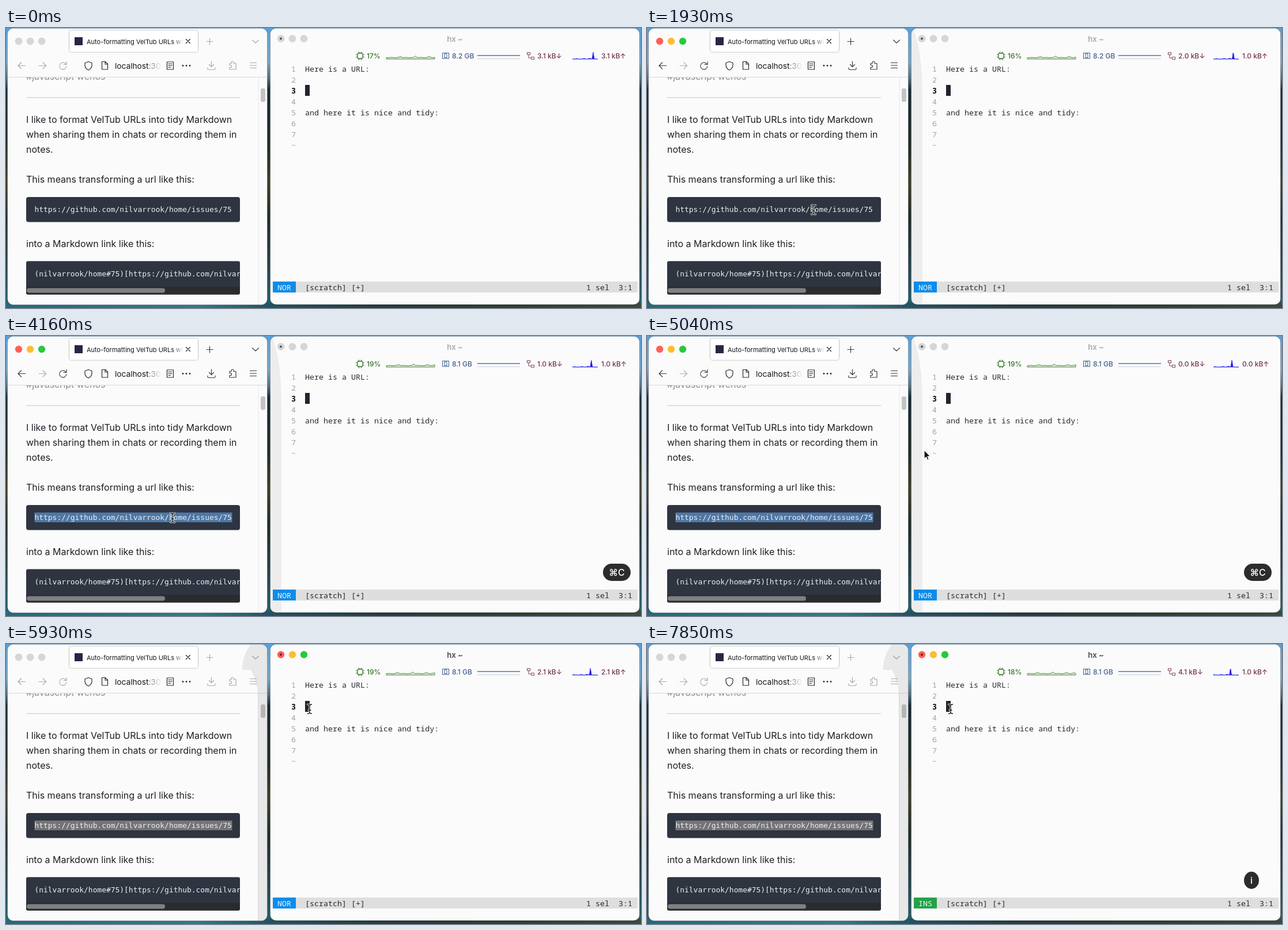
An HTML page that plays this animation: 1102x487 px, repeating every 8 s.

```html
<!DOCTYPE html>
<html lang="en">
<head>
<meta charset="utf-8">
<title>Formatting URLs</title>
<style>
html, body { margin: 0; width: 100%; height: 100%; overflow: hidden; background: #2c4a4e; }
svg { display: block; width: 100%; height: 100%; }
text { white-space: pre; }
.ui { font-family: Inter, "Open Sans", sans-serif; }
.page { font: 16px Inter, sans-serif; fill: #1d1f24; }
.code { font: 12.93px "DejaVu Sans Mono", monospace; fill: #eceff4; }
.term { font: 13.35px "Noto Sans Mono", "DejaVu Sans Mono", monospace; fill: #272a33; }
.stat { font: 500 12px Inter, sans-serif; }
.line { fill: none; stroke-width: 1.2; stroke-linecap: round; stroke-linejoin: round; }
</style>
</head>
<body>
<svg id="stage" viewBox="0 0 1102 487" preserveAspectRatio="none"></svg>
<script>
const LOOP = 8000, STEP = 148.1;
const BROWSER_FOCUS = 1480, SELECT = 2660, COPY = 3400, LEAVE = 4440, TERM_FOCUS = 5480, INSERT = 6660;

const rect = (x, y, w, h, fill, more = '') =>
  `<rect x="${x}" y="${y}" width="${w}" height="${h}" fill="${fill}" ${more}/>`;
const text = (x, y, cls, str, more = '') => `<text x="${x}" y="${y}" class="${cls}" ${more}>${str}</text>`;
const line = (d, more = '') => `<path class="line" d="${d}" ${more}/>`;
const grad = (id, stops, vertical) =>
  `<linearGradient id="${id}" ${vertical ? 'x2="0" y2="1"' : ''}>` +
  stops.map(([o, c, a = 1]) => `<stop offset="${o}" stop-color="${c}" stop-opacity="${a}"/>`).join('') +
  '</linearGradient>';
const lights = (id, y, xs) => xs.map((x, i) =>
  `<circle id="${id}${i}" cx="${x}" cy="${y}" r="6" stroke-width=".5"/>`).join('');

const defs = `<defs>
${grad('sky', [[0, '#5a9fd6'], [.12, '#78a5c4'], [.18, '#52707f'], [.22, '#152a36'], [.42, '#202c26'], [.55, '#413f28'], [.68, '#1d2c29'], [.82, '#263f48'], [1, '#25616f']], true)}
${grad('shore', [[0, '#25697b'], [.3, '#307a8a'], [.42, '#225260'], [.6, '#283a3c'], [.8, '#303f31'], [1, '#3c4a3c']])}
${grad('tabFade', [[0, '#fff', 0], [1, '#fff']])}
${grad('urlFade', [[0, '#fbfbfc', 0], [1, '#fbfbfc']])}
<filter id="soft" x="-10%" y="-30%" width="120%" height="160%"><feDropShadow dx="0" dy="0" stdDeviation="1.3" flood-opacity=".55"/></filter>
<clipPath id="pageClip"><rect x="3" y="86" width="435" height="395"/></clipPath>
<clipPath id="codeClip"><rect x="35" y="405.500" width="371" height="58" rx="3"/></clipPath>
</defs>`;

const desktop = rect(0, 0, 1102, 487, 'url(#sky)') + rect(0, 478, 1102, 9, 'url(#shore)');

const browser = `
${rect(2.5, .5, 451, 481, '#fbfbfc', 'rx="10" stroke="#000" stroke-opacity=".25"')}
${lights('b', 23, [22, 42, 62])}
${rect(110, 4.5, 223, 37, '#fff', 'rx="4" filter="url(#soft)"')}
${rect(119, 16, 14, 14, '#2a2545')}
${text(140, 28, 'ui', 'Auto-formatting VelTub URLs with', 'font-size="11" fill="#15141a"')}
${rect(290, 8, 18, 30, 'url(#tabFade)')}${rect(308, 8, 22, 30, '#fff')}
${line('M312.5 19.5l7 7m0-7l-7 7', 'stroke="#222"')}
<g id="tools">
${line('M348 23.5h11M353.5 18v11M427.5 21l5.500 5 5.500-5')}
${line('M33.500 65.500H21m5.500-5.500L21 65.500l5.500 5.500')}
${line('M104 63a6 6 0 1 0 .8 3.500M105 58.500v5h-5')}
${line('M356.500 58v9m-4-3.500l4 4 4-4M350 69v2q0 1.500 1.500 1.500h10q1.500 0 1.500-1.500v-2')}
${line('M388 61.500h3V60a2 2 0 0 1 4 0v1.500h4V72h-11v-3.500h1.500a2 2 0 0 0 0-4H388z')}
${line('M423.500 60.500h11m-11 4.500h11m-11 4.500h11')}
</g>
${line('M57 65.500h12.500m-5.500-5.500l5.500 5.500-5.500 5.500', 'stroke="#adadb1"')}
<g stroke="#2b2a33">
${line('M143 58.500l6 2.200v4q0 5.500-6 8.500-6-3-6-8.500v-4z')}
${line('M166.500 58.500h6l4 4v9.500h-10zM172 58.500v4.500h4.500')}
${line('M279.500 59h11v13h-11zM282 62.500h6m-6 3h6m-6 3h3.500')}
</g>
${[307, 313, 319].map(x => `<circle cx="${x}" cy="65.500" r="1.4" fill="#2b2a33"/>`).join('')}
${text(189, 70.5, 'ui', 'localhost<tspan fill="#777">:300</tspan>', 'font-size="13.7" fill="#15141a"')}
${rect(250, 56, 20, 20, 'url(#urlFade)')}${rect(270, 56, 8, 20, '#fbfbfc')}
${rect(3, 85, 450, 1, '#d9d9dc')}
<g clip-path="url(#pageClip)">
${text(35, 89.5, 'page', '#javascript wenos', 'style="fill:#8b8b8e"')}
${rect(35, 120, 371, 2, '#dedee0')}
${['I like to format VelTub URLs into tidy Markdown', 'when sharing them in chats or recording them in', 'notes.', '',
   'This means transforming a url like this:'].map((s, i) => text(35, 164.5 + 26.1 * i, 'page', s)).join('')}
${rect(35, 294, 371, 43.5, '#2e3440', 'rx="4"')}
${rect(49.500, 307, 343, 17, '#4d77a5', 'id="sel"')}
${text(49.500, 320, 'code', 'https://github.com/nilvarrook/home/issues/75')}
${text(35, 380.500, 'page', 'into a Markdown link like this:')}
</g>
<g clip-path="url(#codeClip)">
${rect(35, 405, 371, 59, '#2e3440')}${rect(35, 450, 371, 14, '#2b2b2d')}
${rect(36, 452.500, 240, 8, '#808082', 'rx="4"')}
${text(49.500, 431.500, 'code', '(nilvarrook/home#75)[https://github.com/nilvarrook/home')}
</g>
${rect(437.500, 86, 1, 395, '#e8e8ea')}
${rect(442, 105, 8, 23.500, '#c3c3c5', 'rx="3"')}
<path id="browserShade" d="M424 1C413 18 410 30 410 45H425Q434 60 437 85V481H444Q453 481 453 472V10Q453 1 444 1z" opacity=".075"/>`;

const status = `
${rect(610, 44, 9, 9, 'none', 'rx="1" stroke="#3c7a2c" stroke-width="1.3"')}
${line('M612.500 41.500v2m4-2v2m-4 10v2m4-2v2M607.500 46.500h2m-2 4h2m10-4h2m-2 4h2', 'stroke="#3c7a2c" stroke-width=".8"')}
${rect(757.500, 43.500, 11, 9.500, 'none', 'stroke="#3f5f93"')}
${rect(761, 45, 4, 6.500, 'none', 'stroke="#3f5f93"')}
${line('M904.500 42.500h5v4h-5zM911.500 50.500h5v4h-5zM907 46.500v5.500h4.500', 'stroke="#8a5672"')}
${text(626, 53, 'stat', '', 'id="cpu" fill="#34732a"')}
${text(774, 53, 'stat', '', 'id="mem" fill="#415c8c"')}
${text(922, 53, 'stat', '', 'id="down" fill="#74324f"')}
${text(1033, 53, 'stat', '', 'id="up" fill="#74324f"')}
<path id="cpuGraph" fill="#dcead6" stroke="#3d7a30" stroke-width=".9"/>
${rect(818, 47, 74, 1.600, '#5b7fb0')}${rect(818, 53, 74, 1, '#c6d1e0')}
<path id="netGraph" fill="#2018f0" stroke="#2018f0" stroke-width=".7"/>`;

const terminal = `
${rect(458.500, .5, 641, 480.500, '#fbfbfb', 'rx="10" stroke="#000" stroke-opacity=".25"')}
<path id="termShade" d="M468 1Q459 1 459 10V471Q459 480 468 480H478V120Q478 40 462 2z" opacity=".055"/>
${lights('t', 18.500, [477, 497, 517])}
<circle id="dot" cx="477" cy="18.500" r="2"/>
${text(779, 23.500, 'ui', 'hx ~', 'id="title" font-size="13" font-weight="700" text-anchor="middle"')}
${status}
${[1, 2, 3, 4, 5, 6, 7, '~'].map((n, i) => text(495, 76 + 19 * i, 'term', n,
  n === 3 ? 'style="font-weight:700;fill:#111"' : 'style="fill:#a2a2a4"')).join('')}
${text(519, 76, 'term', 'Here is a URL:')}
${text(519, 152, 'term', 'and here it is nice and tidy:')}
${rect(519, 99, 8, 19, '#22242f')}
${rect(463, 441, 633, 19, '#dedede')}
${rect(463, 441, 40, 19, '#0d8ce9', 'id="modeBox"')}
${text(471, 456, 'term', 'NOR', 'id="mode" style="fill:#e9f4fd"')}
${text(519, 456, 'term', '[scratch] [+]')}
${text(1007, 456, 'term', '1 sel  3:1')}`;

const overlay = `
<g id="keys">${rect(1036, 396, 48, 30, '#2c2c2c', 'rx="15" id="pill"')}
${text(1060, 417, 'ui', '', 'id="keyText" font-size="16" font-weight="500" fill="#fff" text-anchor="middle"')}</g>
<path id="arrow" d="M0 0V14.500L3.400 11.400 5.700 16.700 8 15.700 5.700 10.500H10.300z" fill="#111" stroke="#fff" stroke-linejoin="round"/>
<g id="beam" fill="none" stroke-linecap="round">
${['#fff" stroke-width="3', '#111" stroke-width="1.3'].map(s =>
  `<path d="M-3.500-8Q0-8 0-5.500Q0-8 3.500-8M0-5.500V5.500M-3.500 8Q0 8 0 5.500Q0 8 3.500 8M-2 2H2" stroke="${s}"/>`).join('')}
</g>`;

document.getElementById('stage').innerHTML = defs + desktop + browser + terminal + overlay;

const $ = id => document.getElementById(id);
const set = (id, attrs) => { for (const k in attrs) $(id).setAttribute(k, attrs[k]); };
const show = (id, on) => set(id, { visibility: on ? 'visible' : 'hidden' });
const clamp = v => Math.max(0, Math.min(1, v));

// cpu %, memory GB, kB down, kB up; one row per second
const STATS = [[17, 8.2, 3.1, 3.1], [16, 8.2, 1, 1], [16, 8.2, 2, 1], [19, 8.1, 1, 1], [19, 8.1, 1, 1],
  [19, 8.1, 0, 0], [19, 8.1, 2.1, 2.1], [18, 8.1, 2.1, 1], [18, 8.1, 4.1, 1]];

// time, x, y of the pointer tip
const ENTER = [[590, 455, 492], [740, 400, 440], [890, 330, 360], [1030, 295, 320], [1180, 288, 314]];
const CROSS = [[4440, 288, 314], [4590, 340, 318], [4740, 420, 306], [4880, 472, 288], [5030, 480, 201],
  [5180, 510, 140], [5330, 527, 113]];

function along(path, t) {
  let i = 0;
  while (i < path.length - 2 && t > path[i + 1][0]) i++;
  const [a, b] = [path[i], path[i + 1]], k = clamp((t - a[0]) / (b[0] - a[0]));
  return [a[1] + (b[1] - a[1]) * k, a[2] + (b[2] - a[2]) * k];
}

function graph(x0, x1, base, height) {
  let d = `M${x0} ${base}`;
  for (let x = x0; x <= x1; x++) d += `L${x} ${(base - height(x)).toFixed(2)}`;
  return d + `L${x1} ${base}z`;
}

const bump = (x, at, w, h) => h * Math.exp(-(((x - at) / w) ** 2));

function paintLights(id, on) {
  ['#ff5f57', '#febc2e', '#28c840'].forEach((c, i) =>
    set(id + i, { fill: on ? c : '#d6d6d7', stroke: on ? c : '#c4c4c6' }));
}

function drawStats(t) {
  const tick = Math.floor((t + 300) / 1000), [cpu, mem, down, up] = STATS[tick], shift = tick * .8;
  $('cpu').textContent = cpu + '%';
  $('mem').textContent = mem.toFixed(1) + ' GB';
  $('down').textContent = down.toFixed(1) + ' kB↓';
  $('up').textContent = up.toFixed(1) + ' kB↑';
  set('cpuGraph', { d: graph(660, 744, 54, x => {
    const u = x + shift;
    return 2.6 + .3 * Math.sin(u * .5) + bump(u, 685, 3, 1.5) + bump(u, 711, 2, 2.8) + bump(u, 735, 3, 1.5) + bump(u, 748, 2, 1.5);
  }) });
  set('netGraph', { d: graph(983, 1027, 54, x => {
    const u = x + shift;
    return bump(u, 1019, 1.2, 12) + bump(u, 990, 1.5, 1) + bump(u, 1003, 2, 1.2) + bump(u, 1013, 2, 1.5);
  }) });
}

function drawPointer(t) {
  const beam = (t >= BROWSER_FOCUS && t < LEAVE) || t >= TERM_FOCUS;
  show('beam', beam);
  show('arrow', !beam && t >= ENTER[0][0]);
  const [x, y] = beam ? (t < LEAVE ? [289, 316] : [527, 113]) : along(t < LEAVE ? ENTER : CROSS, t);
  set(beam ? 'beam' : 'arrow', { transform: `translate(${x} ${y})` });
}

function draw(time) {
  const t = Math.min(53, Math.floor(time / STEP)) * STEP;
  const inBrowser = t >= BROWSER_FOCUS && t < TERM_FOCUS, inTerm = t >= TERM_FOCUS;
  paintLights('b', inBrowser);
  paintLights('t', inTerm);
  set('tools', { stroke: inBrowser ? '#3b3a42' : '#a9a9ad' });
  set('dot', { fill: inTerm ? '#7e1410' : '#555' });
  set('title', { fill: inTerm ? '#59595b' : '#b1b1b3' });
  show('browserShade', inTerm);
  show('termShade', inBrowser);
  show('sel', t >= SELECT);
  set('sel', { fill: inTerm ? '#747476' : '#4d77a5' });

  const insert = t >= INSERT;
  $('mode').textContent = insert ? 'INS' : 'NOR';
  set('modeBox', { fill: insert ? '#24a148' : '#0d8ce9' });
  $('keyText').textContent = insert ? 'i' : '⌘C';
  set('pill', { width: insert ? 26 : 48 });
  set('keyText', { x: insert ? 1049 : 1060 });
  set('keys', { opacity: insert ? 1 : t < COPY ? 0 : 1 - clamp((t - 5100) / 300) });

  drawStats(t);
  drawPointer(t);
}

function loop(now) {
  draw(now % LOOP);
  requestAnimationFrame(loop);
}
draw(0);
requestAnimationFrame(loop);
</script>
</body>
</html>
```
